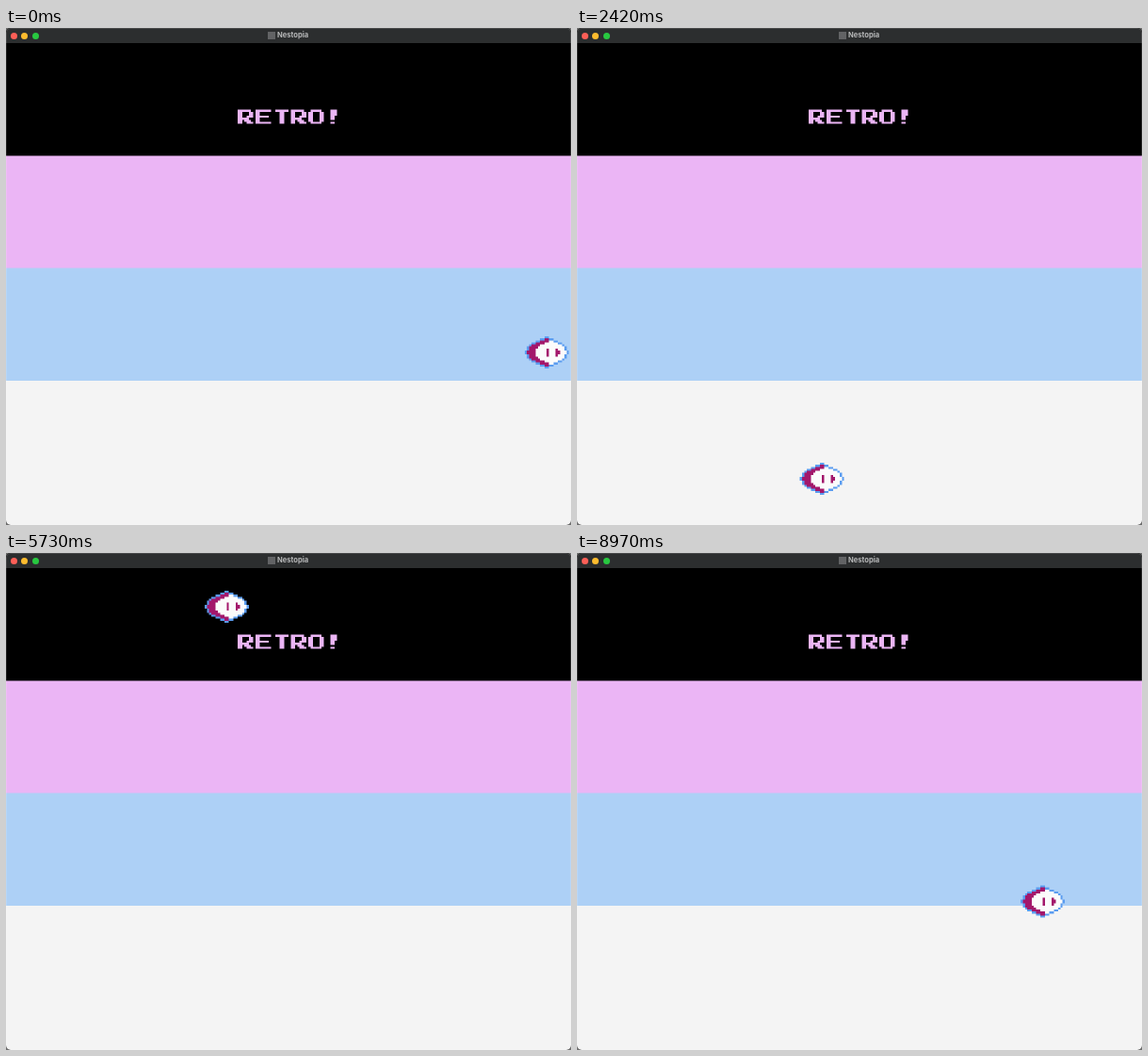
Write an HTML page with a canvas that moves like this. It is 600 px wide and 527 px high and loops after 9 s.

```html
<!DOCTYPE html>
<html lang="en">
<head>
<meta charset="utf-8">
<title>Retro demo</title>
<style>
  html, body { margin: 0; width: 600px; height: 527px; overflow: hidden; background: #6b6b6b; }
  .window { position: absolute; inset: 0; border-radius: 5px; overflow: hidden; background: #000; }
  .window::after { content: ""; position: absolute; inset: 0; border-radius: 5px; box-shadow: inset 0 0 0 1px rgba(255, 255, 255, .12); }
  canvas { position: absolute; left: 0; top: 0; width: 600px; height: 527px; }
  .bar { position: absolute; left: 0; top: 0; width: 600px; height: 16px; background: #2c2e2f; }
  .dot { position: absolute; top: 4.5px; width: 7px; height: 7px; border-radius: 50%; }
  .icon { position: absolute; left: 278px; top: 4px; width: 8px; height: 8px; background: #626365; }
  .name { position: absolute; left: 288px; top: 0; color: #b9babb; font: 700 7.6px/16.5px Inter, "Open Sans", sans-serif; }
</style>
</head>
<body>
<div class="window">
  <canvas id="screen" width="1200" height="1054"></canvas>
  <div class="bar">
    <span class="dot" style="left:4.6px;background:#fe5f57"></span>
    <span class="dot" style="left:16.4px;background:#febc2e"></span>
    <span class="dot" style="left:28.2px;background:#28c840"></span>
    <span class="icon"></span>
    <span class="name">Nestopia</span>
  </div>
</div>
<script>
// The canvas has double density; the console picture is 256 x 240 below the bar
const canvas = document.getElementById('screen');
const ctx = canvas.getContext('2d');
const BAR = 33;
const PX = canvas.width / 256, PY = (canvas.height - BAR) / 240;
const LOOP = 9000, SPEED = 0.0599;
const BANDS = ['#000', '#ebb5f5', '#add0f6', '#f4f4f4'];
const OUTLINE = '#5a9cf0', SHELL = '#a3176b', BODY = '#fbfbfb';

// Letters as bars, each written x y width height
const GLYPHS = {
  R: '0061 0027 5122 4331 2431 3531 4631',
  E: '0071 0027 2341 0671',
  T: '1061 3027',
  O: '1051 0125 5125 1651',
  '!': '2033 2322 2621'
};

function block(x, y, w, h, color) {
  const l = Math.round(x * PX), t = Math.round(y * PY);
  ctx.fillStyle = color;
  ctx.fillRect(l, BAR + t, Math.round((x + w) * PX) - l, Math.round((y + h) * PY) - t);
}

function write(text, x, y, color) {
  [...text].forEach((c, i) => {
    for (const bar of GLYPHS[c].split(' ')) {
      const [bx, by, w, h] = [...bar].map(Number);
      block(x + i * 8 + bx, y + by, w, h, color);
    }
  });
}

// Half the ship's width at a distance d from its middle row
const reach = d => d > 7 ? 0 : 10 - Math.ceil(d * d / 5.9);

function ship(x, y) {
  for (let row = 0; row < 16; row++) {
    const d = row < 8 ? 7 - row : row - 8;
    const r = reach(d), edge = Math.max(1, r - reach(d + 1));
    const left = 10 - r + edge, right = 10 + r - edge;
    const split = Math.min(11, right, 5 + Math.round(d * d / 4));
    block(x + 10 - r, y + row, 2 * r, 1, OUTLINE);
    block(x + left, y + row, split - left, 1, SHELL);
    block(x + split, y + row, right - split, 1, BODY);
  }
  block(x + 10, y + 6, 1, 4, SHELL);
  block(x + 14, y + 6, 1, 4, SHELL);
  block(x + 15, y + 7, 1, 2, SHELL);
}

// Steady speed, stopped by the walls; turns are [time, direction]
function travel(t, pos, min, max, turns) {
  turns.forEach(([from, dir], i) => {
    const until = i + 1 < turns.length ? turns[i + 1][0] : LOOP;
    const time = Math.max(0, Math.min(t, until) - from);
    pos = Math.max(min, Math.min(max, pos + dir * SPEED * time));
  });
  return Math.round(pos);
}

// The picture advances 33 times a second, on 10 ms marks
const mark = k => Math.round(k / 0.33) * 10;
function snap(t) {
  const k = Math.ceil(t * 0.033);
  return mark(k) > t ? mark(k - 1) : mark(k);
}

function draw(t) {
  BANDS.forEach((color, i) => block(0, i * 56, 256, 240 - i * 56, color));
  write('RETRO!', 105, 33, BANDS[1]);
  ship(
    travel(t, 235, 0, 235, [[178, -1], [4233, 1], [8403, -1]]),
    travel(t, 146, 1, 223, [[0, 1], [2192, -1], [6356, 1]])
  );
}

const start = performance.now();
function tick() {
  draw(snap((performance.now() - start) % LOOP));
  requestAnimationFrame(tick);
}
tick();
</script>
</body>
</html>
```
